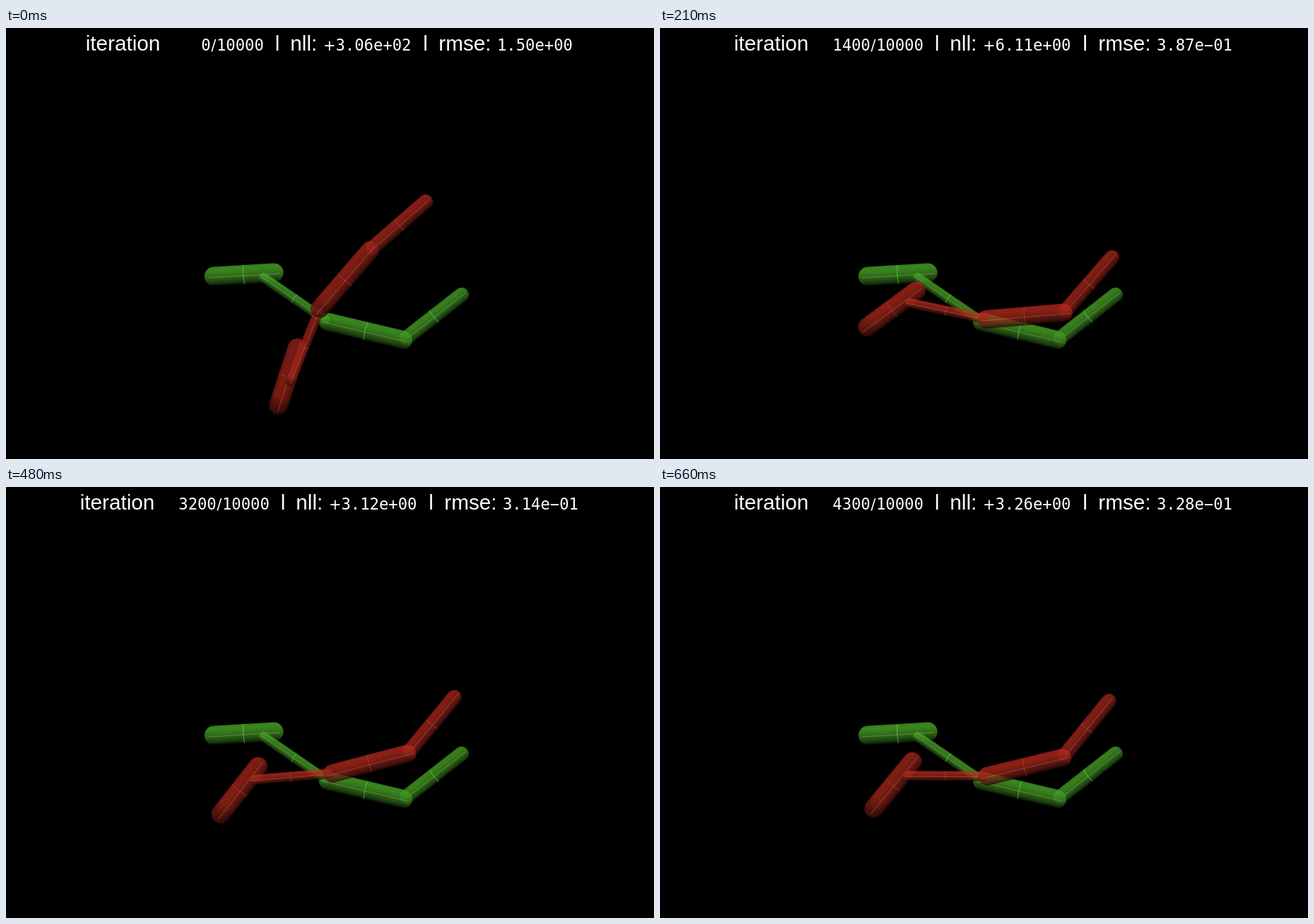
Write an HTML page with a canvas that moves like this. It is 917 px wide and 611 px high and loops after 1.69 s.

```html
<!DOCTYPE html>
<html lang="en">
<head>
<meta charset="utf-8">
<title>Pose fitting</title>
<style>
  html, body { margin: 0; height: 100%; overflow: hidden; background: #000; }
  canvas { display: block; }
</style>
</head>
<body>
<canvas id="stage" width="917" height="611"></canvas>
<script>
const ctx = document.getElementById('stage').getContext('2d');
const LOOP = 1690, STEP = 30, LAST = 22;
const SANS = '29.7px "Liberation Sans", Arial, sans-serif';
const MONO = '22.2px "DejaVu Sans Mono", monospace';
const SIGN = '21px "DejaVu Sans", sans-serif';

const GREEN = { rgb: [98, 224, 52], ring: 'rgba(80,235,80,.6)', axis: 'rgba(190,205,140,.32)' };
const RED = { rgb: [238, 54, 37], ring: 'rgba(235,90,65,.35)', axis: 'rgba(215,170,140,.28)' };

// Pose: hip x, hip y, angles of thigh, shin, spine and head bar (degrees),
// then the bar's slide and sideways offset
const TARGET = [456, 417, 13.3, -38.1, 34.5, -3.4, 27.5, 6.2];
const KEYS = [
  { step: 0, nll: 306, rmse: 1.5, pose: [444, 398, -49.3, -41.1, -68.1, -72, -5.5, 5.6] },
  { step: 5, nll: 6.7, rmse: .392, pose: [461.5, 411, -.8, -46, 13.7, -33.1, 26, 7.8] },
  { step: 10, nll: 5.33, rmse: .38, pose: [463, 416, -11, -53.6, 9.2, -41.7, 24.5, 9.2] },
  { step: 12, nll: 4.17, rmse: .363, pose: [462, 408, -3.7, -46.5, 6.6, -40.3, 24.5, 9.2] },
  { step: 16, nll: 3.12, rmse: .314, pose: [462, 406, -14.7, -50.5, -4.7, -52, 24.5, 7.4] },
  { step: 18, nll: 6.31, rmse: .337, pose: [462, 409, -14.5, -51.7, -1.6, -51.1, 24.5, 7.4] },
  { step: 22, nll: 3.26, rmse: .328, pose: [463, 410, -13.7, -50.9, .3, -50.7, 24, 8.8] }
];

const mix = (a, b, u) => a + (b - a) * u;
const mixLog = (a, b, u) => a * Math.pow(b / a, u);

function stateAt(step) {
  let i = 0;
  while (i < KEYS.length - 2 && step >= KEYS[i + 1].step) i++;
  const a = KEYS[i], b = KEYS[i + 1];
  let u = (step - a.step) / (b.step - a.step);
  if (i === 0) u = 1 - (1 - u) ** 2; // fast early convergence
  return {
    nll: mixLog(a.nll, b.nll, u),
    rmse: mixLog(a.rmse, b.rmse, u),
    pose: a.pose.map((v, k) => mix(v, b.pose[k], u))
  };
}

// Point at distance d along an angle, shifted sideways by n
function along([x, y], deg, d, n = 0) {
  const c = Math.cos(deg * Math.PI / 180), s = Math.sin(deg * Math.PI / 180);
  return [x + d * c - n * s, y + d * s + n * c];
}

function line(a, b, width, style) {
  ctx.lineWidth = width;
  ctx.strokeStyle = style;
  ctx.beginPath();
  ctx.moveTo(...a);
  ctx.lineTo(...b);
  ctx.stroke();
}

function capsule(start, deg, length, r, { rgb, ring, axis }) {
  const end = along(start, deg, length);
  const up = Math.cos(deg * Math.PI / 180);
  const body = ctx.createLinearGradient(...along(start, deg, 0, -r), ...along(start, deg, 0, r));
  for (let i = 0; i <= 8; i++) {
    const s = 1 - i / 4;
    const light = .4 + .34 * s * up + .26 * Math.sqrt(1 - s * s);
    body.addColorStop(i / 8, `rgb(${rgb.map(c => c * light)})`);
  }
  ctx.lineCap = 'round';
  ctx.globalAlpha = .73;
  line(start, end, 2 * r, body);
  ctx.globalAlpha = 1;

  // The lower cap turns away from the light
  const [low, dir] = start[1] > end[1] ? [start, 1] : [end, -1];
  const shade = ctx.createLinearGradient(...along(low, deg, -dir * r), ...along(low, deg, dir * r));
  shade.addColorStop(0, `rgba(0,0,0,${.65 * Math.sqrt(1 - up * up)})`);
  shade.addColorStop(1, 'rgba(0,0,0,0)');
  line(start, end, 2 * r, shade);

  ctx.lineCap = 'butt';
  line(along(start, deg, -r * .7, r * .12), along(end, deg, r * .7, r * .12), 1.1, axis);

  const mid = along(start, deg, length / 2);
  ctx.lineWidth = 1.1;
  ctx.strokeStyle = ring;
  ctx.beginPath();
  ctx.moveTo(...along(mid, deg, 0, -r));
  ctx.quadraticCurveTo(...along(mid, deg, -2), ...along(mid, deg, 0, r));
  ctx.stroke();
}

function figure([x, y, thigh, shin, spine, bar, slide, offset], look) {
  const hip = [x, y];
  const neck = along(hip, spine, -111);
  const knee = along(hip, thigh, 110);
  capsule(along(neck, bar, -slide - 42.5, -offset), bar, 85, 13.5, look);
  capsule(neck, spine, 105, 7, look);
  capsule(along(knee, shin, 5), shin, 98.5, 10.5, look);
  capsule(hip, thigh, 109, 13, look);
}

function text(str, x, font, align = 'left') {
  ctx.font = font;
  ctx.textAlign = align;
  ctx.fillText(str, x, 31.5);
}

function scientific(v) {
  const [m, e] = v.toExponential(2).split('e');
  return `${m}e${e[0] === '-' ? '−' : '+'}${e.slice(1).padStart(2, '0')}`;
}

// The line is centred, so a shorter count pulls both sides inwards
function caption(count, nll, rmse) {
  const digits = String(count);
  const shift = (4 - digits.length) * 8 / 3;
  ctx.fillStyle = '#fff';
  text('iteration', 104.7 + shift, SANS);
  ctx.save();
  ctx.translate(-shift, 0);
  text(digits, 297.7, MONO, 'right');
  text('/', 298.2, SIGN);
  text('10000', 306, MONO);
  text('l', 392, SANS, 'center');
  text('nll:', 410.3, SANS);
  text('+', 457, SIGN);
  text(scientific(nll), 474.5, MONO);
  text('l', 601.5, SANS, 'center');
  text('rmse:', 620.3, SANS);
  text(scientific(rmse), 703, MONO);
  ctx.restore();
}

function draw(now) {
  const step = Math.min(LAST, Math.floor(now % LOOP / STEP));
  const { pose, nll, rmse } = stateAt(step);
  ctx.fillStyle = '#000';
  ctx.fillRect(0, 0, 917, 611);
  figure(TARGET, GREEN);
  figure(pose, RED);
  caption(Math.min(step * 200, 4300), nll, rmse);
}

const begin = performance.now();
function tick() {
  draw(performance.now() - begin);
  requestAnimationFrame(tick);
}
tick();
</script>
</body>
</html>
```
